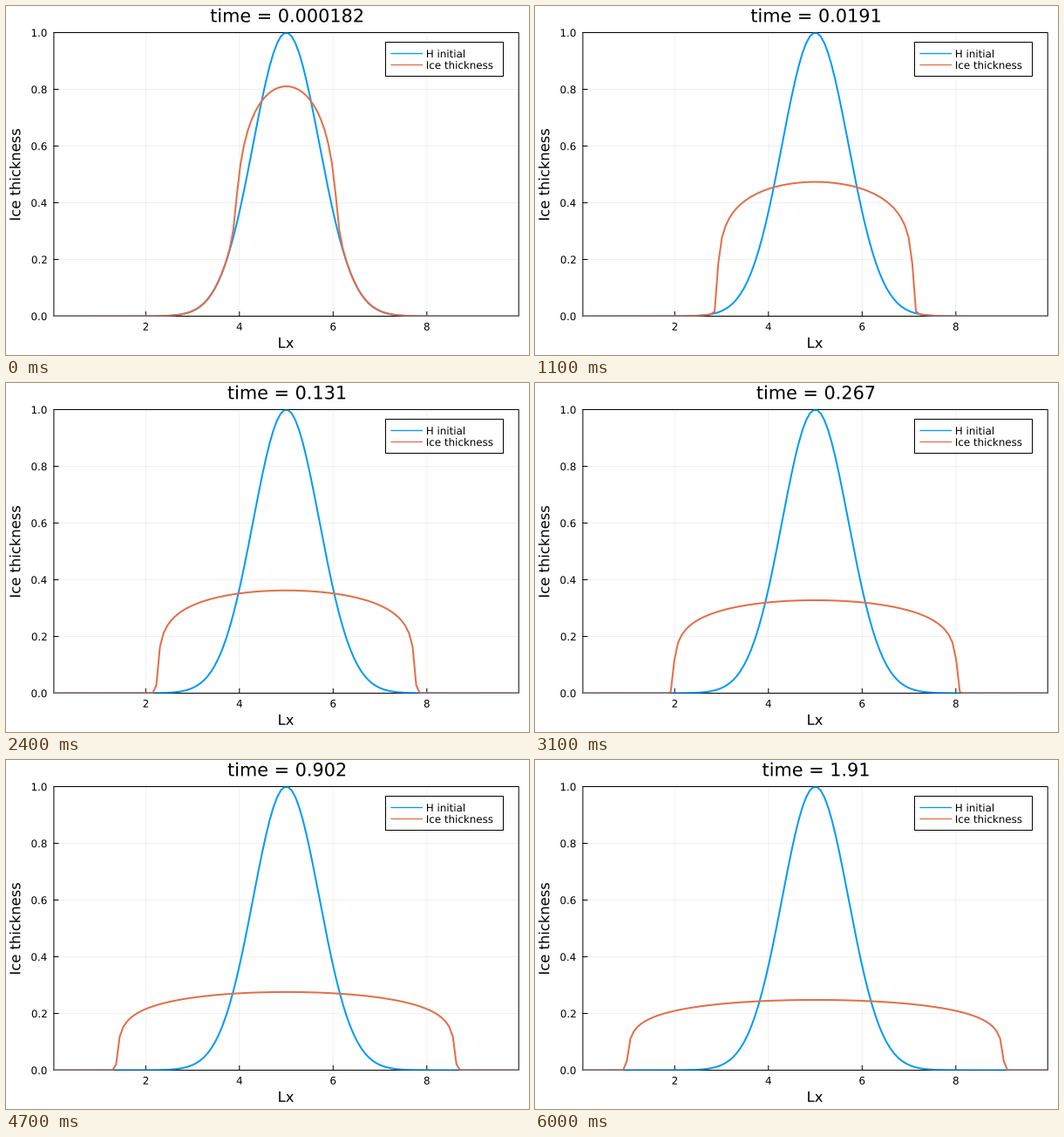
Recreate the animation shown at these times as a matplotlib script. Size 600x400 px, loop 6100 ms.

```python
import matplotlib.pyplot as plt
import numpy as np
from matplotlib.animation import FuncAnimation
from matplotlib.patches import PathPatch, Rectangle
from matplotlib.path import Path
from matplotlib.textpath import TextPath
from matplotlib.transforms import Affine2D

plt.rcParams["font.family"] = "DejaVu Sans"
plt.rcParams["path.snap"] = False

W, H, DPI = 600, 400, 100
FRAMES, INTERVAL = 61, 100
BLUE, ORANGE = "#009afa", "#e36f47"
LEFT, RIGHT, TOP, BOTTOM = 54.9, 588.2, 30.5, 355.5
MID_X, MID_Y = (LEFT + RIGHT) / 2, (TOP + BOTTOM) / 2
TICK_PX, LABEL_PX, TITLE_PX = 11.87, 16.35, 20.8

# Nonlinear diffusion of an ice mound on a cell-centred grid
LENGTH, CELLS = 10.0, 128
STEPS_PER_FRAME = 100
STIFFNESS, POWER = 3150.0, 5
dx = LENGTH / CELLS
xc = (np.arange(CELLS) + 0.5) * dx
initial = np.exp(-(xc - LENGTH / 2) ** 2)


def simulate():
    """Return the time and thickness profile for every frame."""
    ice, time, states = initial.copy(), 0.0, []
    for _ in range(FRAMES):
        for _ in range(STEPS_PER_FRAME):
            diff = STIFFNESS * ice**POWER
            dt = dx**2 / diff.max() / 2.1
            flux = -0.5 * (diff[1:] + diff[:-1]) * np.diff(ice) / dx
            ice[1:-1] -= dt * np.diff(flux) / dx
            time += dt
        states.append((time, ice.copy()))
    return states


def px(x):
    return LEFT + (x - xc[0]) / (xc[-1] - xc[0]) * (RIGHT - LEFT)


def py(y):
    return BOTTOM - y * (BOTTOM - TOP)


def pt(pixels):
    return pixels * 72 / DPI


fig = plt.figure(figsize=(W / DPI, H / DPI), dpi=DPI, facecolor="white")
ax = fig.add_axes([0, 0, 1, 1])
ax.set_xlim(0, W)
ax.set_ylim(H, 0)
ax.axis("off")


def stroke(xs, ys, color="black", width=1.0, **kw):
    return ax.plot(xs, ys, color=color, lw=pt(width), **kw)[0]


def box(x0, y0, x1, y1, **kw):
    ax.add_patch(Rectangle((x0, y0), x1 - x0, y1 - y0, lw=pt(1), ec="black", **kw))


def glyphs(text, size, align):
    """Outline of the text; align 0, 0.5 or 1 puts x at its left, centre or right."""
    path = TextPath((0, 0), text, size=size)
    ink = path.get_extents()
    shift = -align * (ink.x0 + ink.x1) if align == 0.5 else -align * ink.x1
    return path.transformed(Affine2D().translate(shift, 0))


def label(x, y, text, size, align=0.5, angle=0):
    place = Affine2D().rotate_deg(angle).scale(1, -1).translate(x, y)
    patch = PathPatch(glyphs(text, size, align), fc="black", lw=0, zorder=6)
    patch.set_transform(place + ax.transData)
    ax.add_artist(patch)
    return patch


# Grid, ticks and frame
for v in (2, 4, 6, 8):
    x = px(v)
    stroke([x, x], [TOP, BOTTOM], alpha=0.06, zorder=1)
    stroke([x, x], [BOTTOM, BOTTOM - 5], zorder=2)
    label(x, 371.7, str(v), TICK_PX)
for v in np.linspace(0, 1, 6):
    y = py(v)
    stroke([LEFT, RIGHT], [y, y], alpha=0.06, zorder=1)
    stroke([LEFT, LEFT + 5], [y, y], zorder=2)
    label(46.6, y + 4.6, f"{v:.1f}", TICK_PX, align=1)
box(LEFT, TOP, RIGHT, BOTTOM, fill=False, zorder=2)

label(MID_X, 391.8, "Lx", LABEL_PX)
label(16.3, MID_Y, "Ice thickness", LABEL_PX, angle=90)
title = label(MID_X + 0.3, 18.4, "time", TITLE_PX)

# Curves, clipped to the plot area
corners = [(LEFT, TOP), (RIGHT, TOP), (RIGHT, BOTTOM), (LEFT, BOTTOM), (LEFT, TOP)]
curves = [stroke(px(xc), py(initial), c, 2.0, zorder=3) for c in (BLUE, ORANGE)]
for curve in curves:
    curve.set_clip_path(Path(corners, closed=True), ax.transData)

# Legend
box(435.5, 41.5, 570.5, 80.5, fc="white", zorder=4)
for y, c, text in ((54.5, BLUE, "H initial"), (67.5, ORANGE, "Ice thickness")):
    stroke([442, 477.5], [y, y], c, 1.3, zorder=5)
    label(481.8, y + 4.5, text, TICK_PX, align=0)

states = simulate()


def draw(i):
    time, ice = states[i]
    title.set_path(glyphs(f"time = {float(f'{time:.3g}')}", TITLE_PX, 0.5)) if hasattr(title, "set_path") else None
    curves[1].set_ydata(py(ice))
    return title, curves[1]


anim = FuncAnimation(fig, draw, frames=FRAMES, interval=INTERVAL, repeat=True, repeat_delay=0)
plt.show()
```
